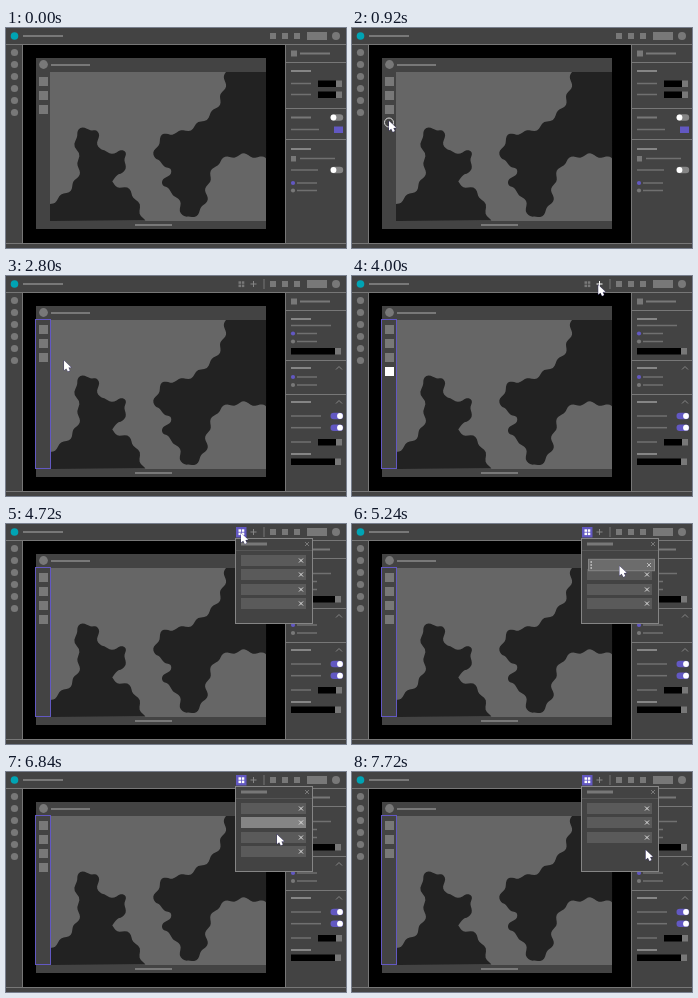
These frames come from a looping animation (340x220 px, 8.6 s). An HTML page with a canvas:

```html
<!DOCTYPE html>
<html lang="en">
<head>
<meta charset="utf-8">
<title>Layout editor</title>
<style>
html, body { margin: 0; width: 100%; height: 100%; overflow: hidden; background: #000; }
canvas { display: block; width: 100vw; height: 100vh; }
</style>
</head>
<body>
<canvas id="stage" width="340" height="220"></canvas>
<script>
const g = document.getElementById('stage').getContext('2d');
const LOOP = 8600, STEP = 40, CLICK = 360;
const BAR = '#434343', EDGE = '#777', SOFT = '#787878', HEAD = '#858585',
      PURPLE = '#6258c2', LAND = '#222', SEA = '#666', WHITE = '#fff';

// Moments when the interface changes
const SELECT = 1160, ADD = 3520, OPEN = 4720, GRAB = 5200, DROP = 6360, REMOVE = 7720;
const changes = [SELECT, ADD, OPEN, REMOVE];   // each follows a click ring

// Cursor stops: departure, arrival, place
const stops = [
  { from: 0, to: 0, x: 154, y: 103 },
  { from: 0, to: SELECT - CLICK, x: 37, y: 93 },
  { from: 2760, to: ADD - CLICK, x: 247.5, y: 9 },
  { from: 3960, to: OPEN - CLICK, x: 235, y: 9 },
  { from: OPEN, to: 5160, x: 267.5, y: 40 },
  { from: 5160, to: 5960, x: 267.5, y: 60 },
  { from: 6760, to: REMOVE - CLICK, x: 293.7, y: 78 }
];

const times = (n, f) => { for (let i = 0; i < n; i++) f(i); };
const rect = (x, y, w, h, color) => { g.fillStyle = color; g.fillRect(x, y, w, h); };
const bar = (x, y, w, color = SOFT) => rect(x, y - 1, w, 2, color);
const thin = (x, y, w) => rect(x, y - .75, w, 1.5, '#707070');
const rule = y => rect(280, y, 60, 1, EDGE);
const frame = (x, y, w, h, color) => {
  g.strokeStyle = color; g.lineWidth = 1; g.strokeRect(x, y, w, h);
};
function disc(x, y, r, color) {
  g.beginPath(); g.arc(x, y, r, 0, 7); g.fillStyle = color; g.fill();
}
function line(points, color) {
  g.beginPath();
  points.forEach(p => g.lineTo(...p));
  g.strokeStyle = color; g.lineWidth = 1; g.stroke();
}
function cross(x, y, color) {
  line([[x - 2, y - 2], [x + 2, y + 2]], color);
  line([[x - 2, y + 2], [x + 2, y - 2]], color);
}

const spline = (a, b, c, d, t) =>
  b + t * (c - a + t * (2 * a - 5 * b + 4 * c - d + t * (3 * (b - c) + d - a))) / 2;

// Landmass: a spline through a few points, rippled by a sine of its length
function coast(points, corner) {
  const at = i => points[Math.max(0, Math.min(points.length - 1, i))];
  const base = [], path = new Path2D();
  times(points.length - 1, i => times(12, j => base.push([0, 1].map(axis =>
    spline(at(i - 1)[axis], at(i)[axis], at(i + 1)[axis], at(i + 2)[axis], j / 12)))));
  base.push(at(points.length));
  let length = 0;
  base.forEach(([x, y], i) => {
    const [px, py] = base[Math.max(0, i - 1)];
    const step = Math.hypot(x - px, y - py);
    length += step;
    const shift = step && 1.7 * Math.sin(length * Math.PI * 2 / 19) / step;
    path.lineTo(x - (y - py) * shift, y + (x - px) * shift);
  });
  path.lineTo(...corner);
  return path;
}
const land = [
  coast([[220, 44], [217, 64], [207, 84], [182, 102], [157, 108], [149, 130], [164, 141],
         [157, 157], [170, 168], [180, 190], [198, 178], [202, 155], [213, 134],
         [236, 127], [260, 131]], [260, 44]),
  coast([[44, 176], [65, 160], [73, 140], [70, 106], [89, 102], [96, 123], [119, 125],
         [116, 145], [105, 154], [126, 165], [138, 193]], [44, 193])
];

function toggle(y, on) {
  g.beginPath();
  g.roundRect(324.5, y - 3.3, 12.7, 6.6, 3.3);
  g.fillStyle = on ? PURPLE : HEAD;
  g.fill();
  disc(on ? 334 : 327.5, y, 2.9, WHITE);
}
function radio(y, on) {
  disc(287, y, 2.1, on ? PURPLE : SOFT);
  thin(291, y, 20);
}
function field(x, y, w) {
  rect(x, y, w, 6.5, '#000');
  rect(x + w, y, 6, 6.5, SOFT);
}
const chevron = y => line([[330, y + 1.5], [333, y - 1.5], [336, y + 1.5]], HEAD);

function pagePanel() {
  bar(285, 43, 20, HEAD);
  [55.5, 66.5].forEach(y => { thin(285, y, 20); field(312, y - 3, 18); });
  rule(80);
  bar(285, 89.5, 20);
  toggle(89.5, false);
  thin(285, 101.5, 28);
  rect(328, 98.5, 9, 6.5, PURPLE);
  rule(111);
  bar(285, 121, 20, HEAD);
  rect(285, 128, 5, 5.5, SOFT);
  thin(294, 130.5, 35);
  thin(285, 142, 27);
  toggle(142, false);
  radio(155, true);
  radio(162.5, false);
}
function widgetPanel() {
  bar(285, 43, 20, HEAD);
  thin(285, 49.5, 40);
  radio(57.5, true);
  radio(65.5, false);
  field(285, 72, 44);
  rule(84);
  bar(285, 92, 20, HEAD);
  chevron(92);
  radio(101, true);
  radio(109, false);
  rule(118);
  bar(285, 126, 20, HEAD);
  chevron(126);
  [140, 151.7].forEach(y => { thin(285, y, 30); toggle(y, true); });
  thin(285, 166, 20);
  field(312, 163, 18);
  bar(285, 178, 20, HEAD);
  field(285, 182.5, 44);
}

function windowView(t) {
  rect(30, 30, 230, 171, BAR);
  disc(37.5, 36.5, 4.4, SOFT);
  bar(45, 37, 39);
  bar(129, 197, 37);
  rect(44, 44, 216, 149, SEA);
  g.fillStyle = LAND;
  land.forEach(path => g.fill(path));
  times(t >= ADD && t < REMOVE ? 4 : 3, i =>
    rect(33, 49 + 14 * i, 9, 9, i === 3 && t < OPEN - CLICK ? WHITE : SOFT));
  if (t >= SELECT) frame(29.5, 43.5, 15, 149, PURPLE);
}

function toolbar(t) {
  rect(0, 0, 340, 16, BAR);
  rect(0, 16, 340, 1, EDGE);
  disc(8.5, 8, 3.8, '#00a4b4');
  bar(17, 8, 40);
  times(3, i => rect(264 + 12 * i, 5, 6, 6, SOFT));
  rect(301, 4, 20, 8, SOFT);
  disc(330, 8, 4, SOFT);
  if (t < SELECT) return;
  const open = t >= OPEN, adding = t >= ADD && t < OPEN - CLICK;
  if (open) rect(230, 3, 10.5, 10.5, PURPLE);
  times(4, i => rect(232.5 + 3.3 * (i % 2), 5.3 + 3.3 * (i >> 1), 2.5, 2.5, open ? WHITE : SOFT));
  const plus = adding ? WHITE : HEAD;
  line([[244.5, 8], [250.5, 8]], plus);
  line([[247.5, 5], [247.5, 11]], plus);
  rect(257.5, 3, 1, 10, EDGE);
}

function popup(t) {
  rect(229, 14, 78, 86, BAR);
  frame(229.5, 14.5, 77, 85, HEAD);
  rect(235, 18.5, 26, 3, SOFT);
  cross(301, 20, SOFT);
  rect(230, 26, 76, 1, '#565656');
  const dragging = t >= GRAB && t < DROP;
  times(t >= REMOVE ? 3 : 4, i => {
    if (i === 0 && dragging) return;
    const dropped = i === 1 && t >= DROP && t < REMOVE - CLICK;
    const top = 31 + Math.round(14.3 * i);
    rect(235, top, 65, 11, dropped ? HEAD : '#5a5a5a');
    cross(295, top + 5.5, '#ddd');
  });
  if (!dragging) return;
  const y = cursorAt(t).y - 1;
  rect(236.5, y - 5.7, 66, 11.4, '#6c6c6c');
  frame(236.5, y - 5.7, 66, 11.4, HEAD);
  [-3, 0, 3].forEach(d => rect(238.5, y + d - .7, 1.4, 1.4, '#ddd'));
  cross(297, y, '#bbb');
}

function cursorAt(t) {
  const i = stops.findLastIndex(s => s.from <= t);
  const a = stops[i - 1], b = stops[i];
  const k = Math.min(1, (t - b.from) / (b.to - b.from));
  return { x: a.x + (b.x - a.x) * k, y: a.y + (b.y - a.y) * k };
}
function cursor(t) {
  if (t < STEP) return;
  const { x, y } = cursorAt(t);
  const change = changes.find(c => t < c && t > c - CLICK);
  if (change) {
    g.beginPath();
    g.arc(x, y + 1.5, 9 * ((change - t) / CLICK) ** 2 + .5, 0, 7);
    g.strokeStyle = '#ddd';
    g.lineWidth = 1;
    g.stroke();
  }
  g.save();
  g.translate(x, y);
  g.beginPath();
  [[0, 0], [0, 9.6], [2.2, 7.8], [3.8, 11], [5.8, 10], [4.4, 7], [7.2, 6.8]]
    .forEach(p => g.lineTo(...p));
  g.closePath();
  g.strokeStyle = '#332b78';
  g.lineWidth = .6;
  g.stroke();
  g.fillStyle = WHITE;
  g.fill();
  g.restore();
}

function draw(t) {
  rect(0, 0, 340, 220, '#000');
  rect(0, 17, 16, 198, BAR);
  rect(16, 17, 1, 198, EDGE);
  times(6, i => disc(8.5, 24.5 + 12 * i, 3.6, SOFT));
  rect(280, 17, 60, 198, BAR);
  rect(279, 17, 1, 198, EDGE);
  rect(0, 215, 340, 1, EDGE);
  rect(0, 216, 340, 4, BAR);
  rect(285, 22.5, 6, 6, SOFT);
  bar(294, 25.5, 30);
  rule(34);
  t < SELECT ? pagePanel() : widgetPanel();
  windowView(t);
  toolbar(t);
  // New controls blink to draw attention
  const blink = Math.floor((t - SELECT) / 200);
  if (blink >= 0 && blink < 5 && blink % 2 === 0) {
    frame(227.5, 1.5, 27, 13, PURPLE);
    frame(279.5, 16.5, 60, 199, PURPLE);
  }
  if (t >= OPEN) popup(t);
  cursor(t);
}

function tick() {
  const t = performance.now() % LOOP;
  draw(Math.floor(t / STEP) * STEP);
  requestAnimationFrame(tick);
}
tick();
</script>
</body>
</html>
```
